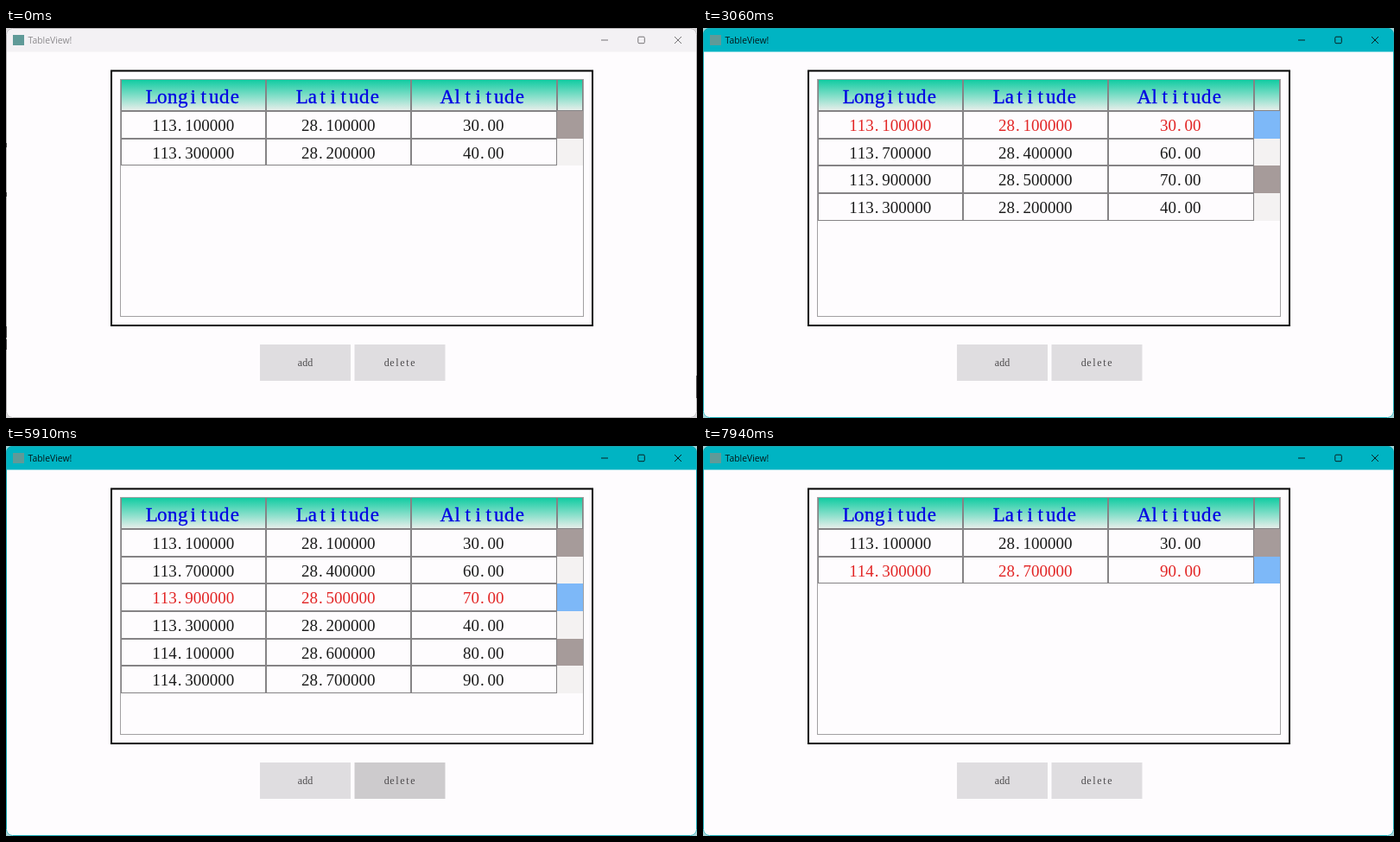
Animation of 800 by 451 pixels, one loop 8 s. Source, as an HTML page with a canvas:

```html
<!DOCTYPE html>
<html lang="en">
<head>
<meta charset="utf-8">
<title>Table</title>
<style>
  html, body { margin: 0; width: 100%; height: 100%; overflow: hidden; background: #fefcfe; }
  canvas { display: block; width: 800px; height: 451px; }
</style>
</head>
<body>
<canvas id="stage" width="800" height="451"></canvas>
<script>
const ctx = document.getElementById('stage').getContext('2d');
const LOOP = 8000;
const SERIF = '"Liberation Serif", serif';
const GREY = '#858385';
const COLUMNS = [133, 301, 469, 638];
const TEXT_OFFSET = 83.8;
const HEADERS = ['Longitude', 'Latitude', 'Altitude'];
const TOP = 96, PITCH = 31.65;

// Each step: start time, and the values that change from then on.
// Row n reads 113.1 + 0.2n, 28.1 + 0.1n, 30 + 10n.
const STEPS = [
  [0, { rows: [0, 1], selected: -1, pressed: '', bar: 0, title: 0 }],
  [1550, { bar: 1 }],
  [1580, { title: 1, selected: 0 }],
  [2300, { pressed: 'add' }],
  [2390, { pressed: '', rows: [0, 3, 1] }],
  [2940, { pressed: 'add' }],
  [3030, { pressed: '', rows: [0, 3, 4, 1] }],
  [3520, { selected: 3 }],
  [4210, { pressed: 'add' }],
  [4300, { pressed: '', rows: [0, 3, 4, 1, 5] }],
  [4570, { pressed: 'add' }],
  [4660, { pressed: '', rows: [0, 3, 4, 1, 5, 6] }],
  [5240, { selected: 2 }],
  [5910, { pressed: 'delete' }],
  [6000, { pressed: '', rows: [0, 3, 1, 5, 6] }],
  [6390, { selected: 1 }],
  [7030, { pressed: 'delete' }],
  [7120, { pressed: '', rows: [0, 1, 5, 6] }],
  [7360, { pressed: 'delete' }],
  [7450, { pressed: '', rows: [0, 5, 6] }],
  [7730, { pressed: 'delete' }],
  [7820, { pressed: '', rows: [0, 6] }]
];

const stateAt = time =>
  Object.assign({}, ...STEPS.filter(([start]) => start <= time).map(([, change]) => change));

function box(x, y, w, h, color) {
  ctx.fillStyle = color;
  ctx.fillRect(x, y, w, h);
}

function outline(x, y, w, h, color, width = 1) {
  ctx.strokeStyle = color;
  ctx.lineWidth = width;
  ctx.strokeRect(x, y, w, h);
}

// Cell edges snap to whole pixels so neighbouring borders form a double line.
function cell(x0, y0, x1, y1) {
  const [left, top, right, bottom] = [x0, y0, x1, y1].map(Math.round);
  outline(left + 0.5, top + 0.5, right - left - 1, bottom - top - 1, GREY);
}

// Half-width lettering: every character sits centred in a step of equal width.
function halfWidth(text, cx, baseline, size, color, step = size / 2, bold = 0) {
  ctx.font = `${size}px ${SERIF}`;
  ctx.textAlign = 'center';
  ctx.fillStyle = ctx.strokeStyle = color;
  ctx.lineWidth = bold;
  [...text].forEach((char, i) => {
    const x = cx + (i - (text.length - 1) / 2) * step - (char === '.' ? step * 0.15 : 0);
    ctx.fillText(char, x, baseline);
    if (bold) ctx.strokeText(char, x, baseline);
  });
}

function drawWindow({ bar, title }) {
  box(0, 0, 800, 451, title ? '#9fcdd1' : '#d2d0d2');
  ctx.save();
  ctx.beginPath();
  ctx.roundRect(0, 0, 800, 451, 7);
  ctx.clip();
  box(0, 0, 800, 451, '#fefcfe');
  box(0, 0, 800, 27.5, bar ? '#00b4c3' : '#f3f1f4');
  ctx.restore();

  ctx.strokeStyle = title ? '#18a8b3' : '#b5b3b5';
  ctx.lineWidth = 1;
  ctx.beginPath();
  ctx.roundRect(0.5, 0.5, 799, 450, 7);
  ctx.stroke();
  if (!title) {
    [[0, 133, 5], [0, 190, 5], [0, 345, 13], [0, 360, 12], [799, 402, 26]]
      .forEach(([x, y, h]) => box(x, y, 1, h, '#4a484a'));
  }

  box(8, 8, 13, 12, '#5f9a98');
  ctx.font = '10.4px "Open Sans", "Noto Sans", sans-serif';
  ctx.textAlign = 'left';
  ctx.fillStyle = !bar ? '#8d8b8e' : title ? '#04181a' : '#55979d';
  ctx.fillText('TableView!', 25.5, 18);

  ctx.strokeStyle = bar ? '#0a2022' : '#757376';
  ctx.lineWidth = 1;
  ctx.beginPath();
  ctx.moveTo(689, 14);
  ctx.lineTo(697, 14);
  ctx.roundRect(731.8, 10.2, 7.5, 7.5, 1.2);
  ctx.moveTo(774, 10);
  ctx.lineTo(782, 18);
  ctx.moveTo(782, 10);
  ctx.lineTo(774, 18);
  ctx.stroke();
}

function drawHeader() {
  const shade = ctx.createLinearGradient(0, 59, 0, 96);
  shade.addColorStop(0, '#0bcba0');
  shade.addColorStop(1, '#ecefec');
  box(133, 59, 535, TOP - 59, shade);
  [...COLUMNS, 668].slice(1).forEach((right, i) => cell(COLUMNS[i], 59, right, TOP));
  HEADERS.forEach((text, i) =>
    halfWidth(text, COLUMNS[i] + TEXT_OFFSET, 86.5, 23, '#0000e4', 12, 0.3));
}

function drawRow(n, index, selected) {
  const top = TOP + index * PITCH;
  const bottom = top + PITCH;
  const values = [(113.1 + n * 0.2).toFixed(6), (28.1 + n * 0.1).toFixed(6), (30 + n * 10).toFixed(2)];
  values.forEach((text, i) => {
    cell(COLUMNS[i], top, COLUMNS[i + 1], bottom);
    halfWidth(text, COLUMNS[i] + TEXT_OFFSET, top + 23, 19, selected ? '#e22525' : '#1a1a1a');
  });
  const color = selected ? '#7db8f8' : index % 2 ? '#f4f2f2' : '#a69b9a';
  box(638, Math.round(top), 30, Math.round(bottom) - Math.round(top), color);
}

function drawButton(label, x, pressed) {
  box(x, 366, 105, 42, pressed ? '#cdcbcd' : '#dfdde0');
  halfWidth(label, x + 52.3, 391, 12, '#4c4a4c');
}

function draw(time) {
  const state = stateAt(time);
  drawWindow(state);
  outline(122, 49.5, 557, 294.5, '#000', 2);
  drawHeader();
  outline(132.5, 59.5, 536, 274, '#a2a0a2');
  state.rows.forEach((n, i) => drawRow(n, i, i === state.selected));
  drawButton('add', 294, state.pressed === 'add');
  drawButton('delete', 403.5, state.pressed === 'delete');
}

const begin = performance.now();
function tick() {
  draw((performance.now() - begin) % LOOP);
  requestAnimationFrame(tick);
}
tick();
</script>
</body>
</html>
```
